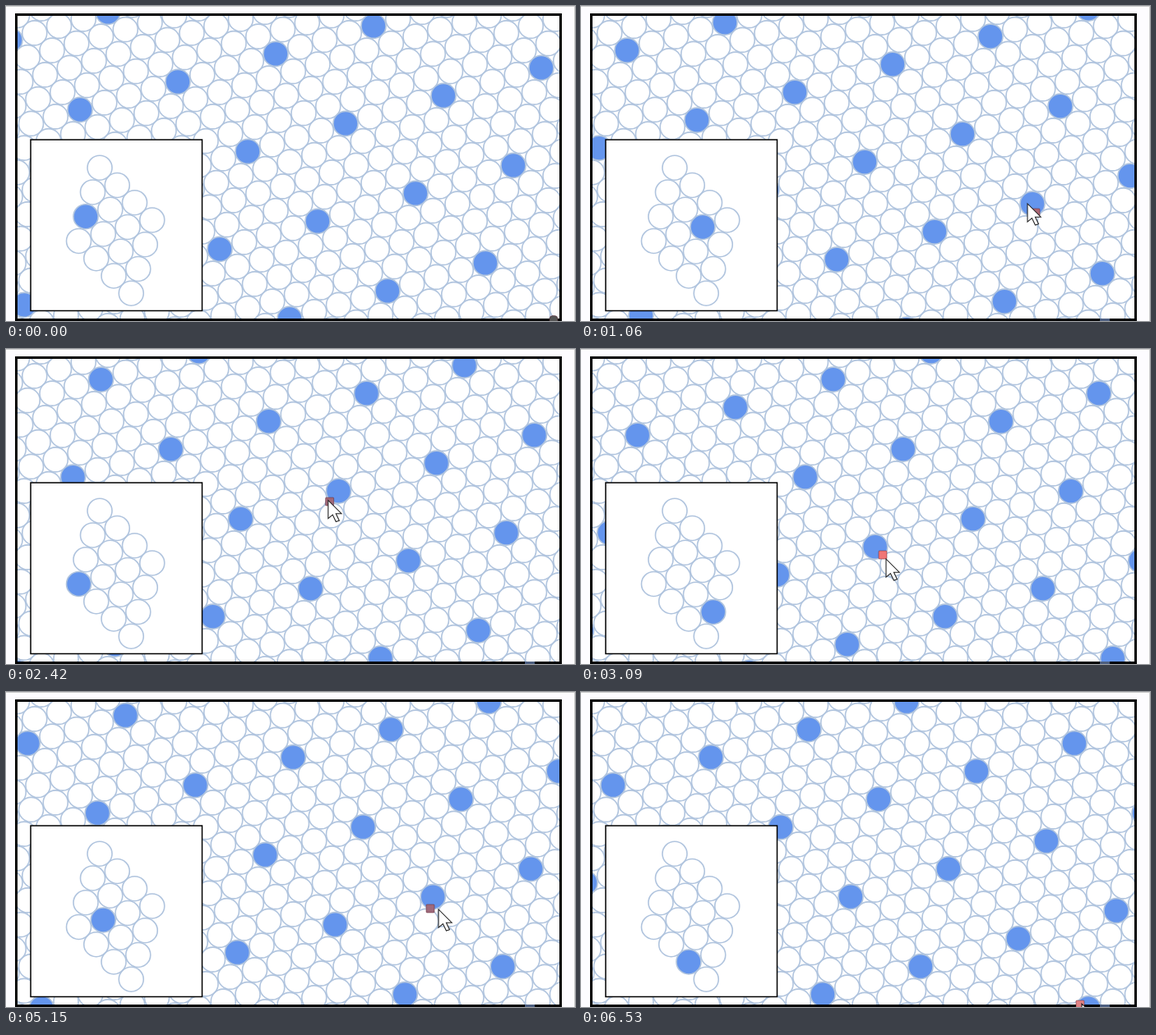
Animation, 692 px wide and 384 px high, one loop 7.09 s. Source, as an HTML page with a canvas:

```html
<!DOCTYPE html>
<html lang="en">
<head>
<meta charset="utf-8">
<title>Periodic lattice</title>
<style>
html, body { margin: 0; width: 100%; height: 100%; overflow: hidden; background: #fdfcff; }
canvas { display: block; }
</style>
</head>
<body>
<canvas id="stage" width="692" height="384"></canvas>
<script>
const ctx = document.getElementById('stage').getContext('2d');
const LOOP = 7090, STEP = 50, RADIUS = 15, CELL = 4;
const A = [-8.5, 29.75], B = [21.25, 21.25];

// time, handle x y, pointer x y, handle colour r g b
const keys = [
  [400, 666, 382.5, 672, 392, 85, 85, 85],
  [1060, 553, 252, 543, 241, 172, 104, 116],
  [1820, 441, 149, 434, 141, 88, 92, 122],
  [3090, 367, 251, 371, 256, 240, 118, 118],
  [4060, 413, 294, 421, 298, 218, 144, 152],
  [5150, 516, 264, 526, 265, 158, 106, 124],
  [6530, 607, 381, 609, 380, 226, 130, 132]
];

const site = (x, y, i, j) => [x + i * A[0] + j * B[0], y + i * A[1] + j * B[1]];

const sites = [];
for (let i = -18; i <= 12; i++)
  for (let j = -12; j <= 32; j++) {
    const [x, y] = site(107, 66.9, i, j);
    if (x > -10 && x < 710 && y > -10 && y < 405) sites.push({ i, j, x, y });
  }

const mod = n => ((n % CELL) + CELL) % CELL;

function slope(n, c) {
  const p = keys[n - 1], q = keys[n + 1];
  return p && q ? (q[c] - p[c]) / (q[0] - p[0]) : 0;
}

// Smooth curve through the keys, sampled in steps
function pose(t) {
  const last = keys.length - 1;
  if (t < keys[0][0]) return keys[0];
  if (t >= keys[last][0]) return keys[last];
  let n = 0;
  while (t >= keys[n + 1][0]) n++;
  const p = keys[n], q = keys[n + 1], span = q[0] - p[0];
  const u = Math.floor((t - p[0]) / STEP) * STEP / span;
  return p.map((v, c) => {
    if (c > 4) return v + (q[c] - v) * u;
    const w = 1 - u;
    return v * w * w * (1 + 2 * u) + q[c] * u * u * (3 - 2 * u) +
      span * u * w * (w * slope(n, c) - u * slope(n + 1, c));
  });
}

function disc(x, y, on) {
  ctx.beginPath();
  ctx.arc(x, y, RADIUS, 0, 2 * Math.PI);
  if (on) {
    ctx.fillStyle = '#6495ed';
    ctx.fill();
  }
  ctx.strokeStyle = '#b0c4de';
  ctx.lineWidth = 1.6;
  ctx.stroke();
}

function box(x, y, w, h, width) {
  ctx.strokeStyle = '#000';
  ctx.lineWidth = width;
  ctx.strokeRect(x, y, w, h);
}

function lattice(hit) {
  ctx.save();
  ctx.beginPath();
  ctx.rect(14, 12, 659, 369);
  ctx.clip();
  ctx.fillStyle = '#fff';
  ctx.fillRect(14, 12, 659, 369);
  for (const s of sites)
    disc(s.x, s.y, mod(s.i - hit.i) === 0 && mod(s.j - hit.j) === 0);
  ctx.restore();
}

function inset(hit) {
  ctx.fillStyle = '#fff';
  ctx.fillRect(30, 163, 208.5, 208.5);
  box(30, 163, 208.5, 208.5, 1.5);
  for (let i = 0; i < CELL; i++)
    for (let j = 0; j < CELL; j++)
      disc(...site(114, 197.2, i, j), i === mod(hit.i) && j === mod(hit.j));
}

function handle(x, y, color, corner) {
  ctx.beginPath();
  ctx.roundRect(x - 5, y - 5, 10, 10, corner);
  ctx.fillStyle = color;
  ctx.fill();
  ctx.strokeStyle = 'rgba(90, 30, 40, .45)';
  ctx.lineWidth = 1;
  ctx.stroke();
}

function pointer(x, y) {
  ctx.save();
  ctx.translate(x, y);
  ctx.scale(1.35, 1.3);
  ctx.fillStyle = '#fff';
  ctx.strokeStyle = '#222';
  ctx.lineWidth = 0.8;
  const arrow = new Path2D('M0 0V17L4 13.5L7 20L10 19L7 12.5H12Z');
  ctx.fill(arrow);
  ctx.stroke(arrow);
  ctx.restore();
}

function draw(t) {
  const [, hx, hy, px, py, ...rgb] = pose(t);
  const gap = s => Math.hypot(s.x - hx, s.y - hy);
  const hit = sites.reduce((best, s) => gap(s) < gap(best) ? s : best);
  const moved = t >= 450;

  ctx.fillStyle = '#fdfcff';
  ctx.fillRect(0, 0, 692, 384);
  ctx.fillStyle = '#ccc';
  ctx.fillRect(0, 0, 692, 1);
  ctx.fillRect(691, 0, 1, 384);

  lattice(hit);
  box(12.5, 10.5, 662, 372, 3);
  inset(hit);
  if (moved) {
    ctx.fillStyle = '#4d5f80';
    ctx.fillRect(631, 381, 12, 3);
  }
  handle(hx, hy, `rgb(${rgb})`, moved ? 1 : 4);
  pointer(px, py);
}

function tick() {
  draw(performance.now() % LOOP);
  requestAnimationFrame(tick);
}
tick();
</script>
</body>
</html>
```
